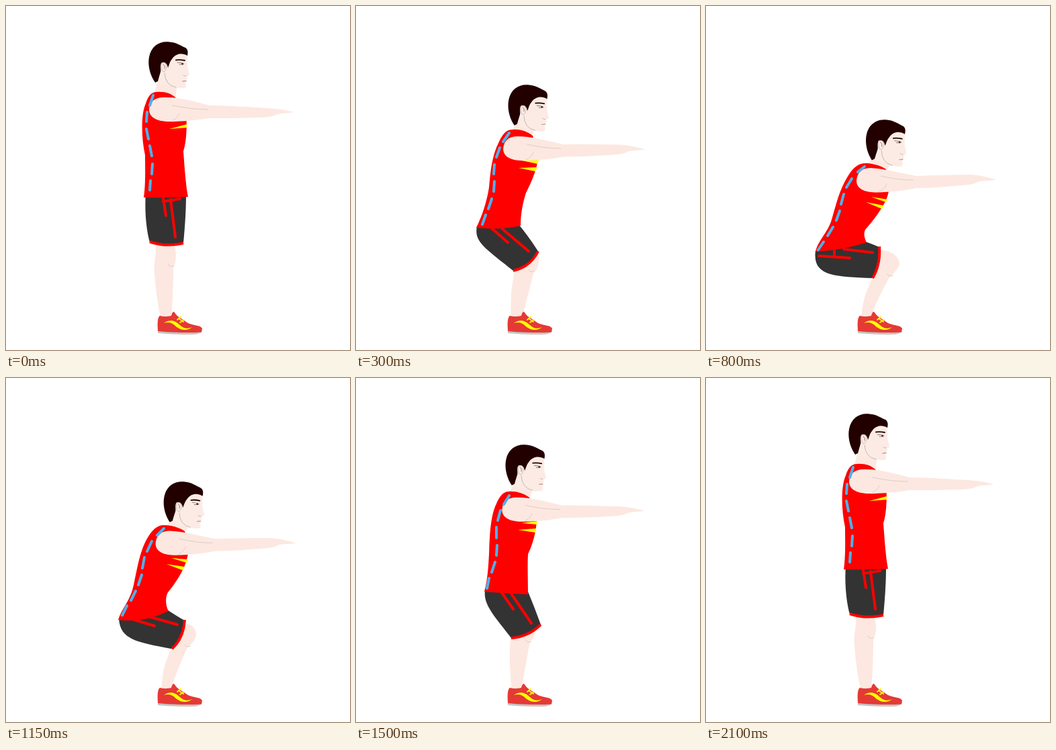
Write an HTML page that moves like this. It is 512 px wide and 512 px high and loops after 2150 ms.

```html
<!DOCTYPE html>
<html lang="en">
<head>
<meta charset="utf-8">
<title>Squat</title>
<style>
  html, body { margin: 0; width: 100%; height: 100%; overflow: hidden; background: #fff; }
  svg { display: block; width: 100%; height: 100%; }
  .red { fill: #f00; }
  .skin { fill: #fce8e0; }
  .dark { fill: #333; }
  .hair { fill: #200; }
  .yellow { fill: #ff0; }
  .line { fill: none; stroke-linecap: round; stroke-linejoin: round; }
  .trim { stroke: #f00; stroke-width: 4; }
  .spine { stroke: #4db1ea; stroke-width: 4; }
  .crease { stroke: #d3c5bf; stroke-width: .8; }
</style>
</head>
<body>
<svg viewBox="0 0 512 512">
  <path id="leg" class="skin"/>
  <path id="knee" class="line crease"/>
  <path id="shorts" class="dark"/>
  <path id="stripes" class="line trim"/>
  <path id="cuff" class="line trim" style="stroke-linecap:butt"/>
  <path id="neck" class="skin"/>
  <path id="torso" class="red"/>
  <path id="wedges" class="yellow"/>
  <path id="arm" class="skin"/>
  <path id="folds" class="line crease"/>
  <path id="spine" class="line spine"/>
  <g id="head">
    <path fill="#fcebe4" d="M229 99L232 84L248 70L269 70C271 82 269 89 271 94L273 101Q273 104 269 105L270 108L268 110L269 112L267 114Q269 118 267 122C257 123 250 122 243 118L228 116Z"/>
    <path class="hair" d="M222 114C213 101 211 86 213 76C216 60 228 52 243 53.5C253 54 260 59 267 62Q272 65 270 74C262 69 252 71 247 79C243 84 243 88 241 92C240 85 235 82 231 85C229 90 231 95 230 98L226 112Z"/>
    <path fill="#fcebe4" stroke="#b9a8a3" stroke-width=".7" d="M231 86Q237 82 239 89Q239 96 235 98Q231 97 231 86Z"/>
    <path class="line" stroke="#776460" stroke-width=".8" d="M234 87Q237 88 236 93"/>
    <path class="line" stroke="#b5aaa7" stroke-width=".8" d="M236 100Q237 118 253 121M264 103Q266 105 268 104"/>
    <path class="line" stroke="#200" stroke-width="1.8" d="M253 80.5Q259 79.500 266 81"/>
    <path class="line" stroke="#8b7c78" stroke-width="1" d="M255 84Q260 84 265 86M258 87L264 87"/>
    <circle cx="262.500" cy="86" r="1.300" fill="#322"/>
    <path class="line" stroke="#c99b96" stroke-width="1.400" d="M263 112L268 111.500"/>
  </g>
  <g id="shoe">
    <path fill="#c4c4c4" d="M226 481Q255 485 292 483Q290 489 276 489Q245 489 226 487Z"/>
    <path fill="#e53935" d="M226 484C225 470 226 463 229 461C236 463 242 462 246 461C247 457 248 455 250 455C252 457 253 460 256 462L271 472C280 476 290 475 292 480L291 485.500Q258 487 226 484Z"/>
    <path class="yellow" d="M235 472C245 465 253 469 259 475C264 480 270 481 277 478C270 484 260 483 253 477C247 471 242 470 235 472Z"/>
    <path class="line" stroke="#ff0" stroke-width="1.700" d="M255 467L260 462.500M259 471L265 467M257 465L264 470"/>
  </g>
</svg>
<script>
// Head drop, in px, at each time
const timeline = [
  [0, 0], [300, 64], [550, 116], [800, 116], [900, 115], [1000, 111.5], [1050, 109],
  [1100, 105.5], [1150, 101], [1300, 77], [1500, 46], [1700, 16], [1800, 1], [1850, 0], [2150, 0]
];
const loop = 2150, step = 50, lowest = 116;

// Outlines at each of these drops
const drops = [0, 16, 46, 64, 101, lowest];
const shapes = {
  torso: [
    "M205,285 C208,265 207,240 207,222 C201,195 201,160 208,145 C211,135 216,128 224,128 C236,127 246,130 253,137 L268,160 C270,180 268,205 264,216 C266,245 268,270 271,284 Q238,286 205,285Z",
    "M200,294 C203,275 205,255 204,236 C200,210 199,178 207,160 C210,150 216,142 224,142 C236,141 246,144 254,151 L267,176 C270,195 266,218 261,231 C262,255 264,275 266,295 Q233,296 200,294Z",
    "M191,318 C196,300 197,280 198,262 C199,235 200,205 209,187 C213,177 219,169 227,169 C239,168 250,172 258,178 L269,203 C270,222 264,246 256,262 C255,282 256,302 256,322 Q224,321 191,318Z",
    "M179,330 C188,312 195,290 198,270 C200,245 203,222 212,204 C217,192 224,183 233,184 C245,183 255,187 263,193 L271,225 C270,242 262,260 253,278 C248,294 245,310 245,327 Q215,334 179,330Z",
    "M167,360 C172,343 186,330 190,308 C195,285 199,258 210,239 C217,227 224,219 235,219 C247,219 258,223 266,228 L271,258 C271,275 257,300 241,319 C237,326 237,338 242,347 Q205,365 167,360Z",
    "M163,366 C167,348 181,338 187,318 C194,294 199,272 212,252 C219,241 226,234 238,234 C249,234 260,238 268,243 L272,274 C271,290 255,312 237,333 C234,339 236,346 239,352 Q205,363 163,366Z"
  ],
  shorts: [
    "M208,280 C206,305 209,335 214,352 Q238,359 264,353 Q268,310 268,282Z",
    "M204,290 C204,318 210,343 217,366 Q242,373 267,362 Q266,320 264,292Z",
    "M192,316 C189,338 207,355 231,387 Q257,385 275,367 Q266,342 256,318Z",
    "M180,328 C175,352 195,362 234,394 Q260,388 271,365 Q257,343 242,325Z",
    "M168,358 C170,390 195,393 246,403 Q265,388 266,361 Q252,353 240,345Z",
    "M163,364 C158,402 190,403 248,405 Q260,385 258,359 Q247,354 238,351Z"
  ],
  cuff: [
    "M214,351 Q238,359 264,353",
    "M217,366 Q242,373 267,362",
    "M231,387 Q257,385 275,367",
    "M234,394 Q260,388 271,365",
    "M247,403 Q264,388 266,360",
    "M248,405 Q260,385 258,358"
  ],
  stripes: [
    "M234,286 L238,312 M245,288 L252,344 M234,291 L259,287",
    "M229,297 L237,327 M239,297 L254,356 M231,303 L256,297",
    "M216,318 L234,344 M231,321 L261,365 M218,316 L245,316",
    "M201,330 L226,352 M218,332 L257,365 M205,326 L232,324",
    "M178,356 L221,369 M212,355 L255,367 M190,355 L200,353",
    "M168,372 L214,375 M205,362 L248,367 M191,364 L191,372"
  ],
  leg: [
    "M222,350 C226,370 219,375 221,400 Q224,435 230,464 L246,464 Q249,425 249,390 Q253,382 253,370 Q252,362 251,350Z",
    "M226,365 C223,375 222,392 225,412 Q227,440 233,464 L246,464 Q249,425 250,390 Q255,382 256,372 Q256,368 256,362Z",
    "M230,380 C230,395 228,410 229,425 Q230,445 231,464 L246,464 Q252,430 259,392 Q264,389 266,382 Q267,378 267,372Z",
    "M236,385 C236,400 231,420 231,430 Q230,445 231,464 L247,464 Q255,435 264,398 Q271,391 272,382 Q273,374 271,366Z",
    "M247,398 C243,410 236,425 234,438 Q232,450 231,464 L246,464 Q250,445 270,401 Q284,390 283,380 Q281,366 264,365Z",
    "M249,400 C245,412 238,425 235,438 Q232,450 231,464 L246,464 Q250,445 273,404 Q288,390 288,383 Q285,365 258,363Z"
  ],
  wedges: [
    "M243,183 L269,176 L269,181Z M245,173 L269,162 L269,167Z",
    "M241,198 L268,192 L268,197Z M245,187 L268,181 L268,186Z",
    "M241,226 L268,224 L267,230Z M246,216 L270,213 L269,218Z",
    "M242,241 L270,240 L267,246Z M247,230 L272,229 L270,235Z",
    "M239,277 L266,281 L263,286Z M246,268 L271,270 L269,275Z",
    "M238,292 L265,297 L262,302Z M246,284 L270,288 L268,292Z"
  ],
  spine: [
    "M219,133 L214,148 M210,158 L209,172 M209,183 L212,198 M214,208 L217,223 M218,235 L217,250 M215,260 L214,274",
    "M221,149 L215,161 M211,172 L209,187 M209,198 L211,213 M214,223 L215,239 M214,250 L212,265 M209,275 L208,290",
    "M228,175 L220,188 M215,197 L211,212 M209,222 L209,238 M210,249 L209,264 M207,274 L202,289 M198,298 L195,313",
    "M228,189 L219,202 M214,211 L209,225 M206,236 L205,250 M206,261 L205,276 M202,287 L197,302 M193,311 L188,325",
    "M235,224 L225,234 M217,243 L210,258 M206,267 L203,283 M202,293 L197,308 M193,317 L186,331 M180,339 L173,353",
    "M236,239 L226,247 M217,257 L209,270 M205,280 L201,295 M199,305 L194,319 M189,329 L181,342 M175,351 L167,363"
  ]
};

// Parts that move evenly between standing and squatting
const simple = {
  arm: [
    "M213,154 C214,142 222,136 234,136 C256,135 280,142 303,148 C335,148 365,151 391,152 C405,153 418,155 428,158 C420,160 412,159 404,161 C396,165 388,166 375,166 C350,167 325,167 301,167 C285,170 262,172 243,172 C225,172 213,166 213,154Z",
    "M224,260 C225,247 233,241 245,241 C266,242 290,249 313,253 C340,252 368,251 396,251 C410,252 422,256 432,258.5 C422,261 412,259 405,262 C398,266 388,266 380,267 C356,269 335,271 313,271 C297,275 272,277 252,277.5 C234,277 224,271 224,260Z"
  ],
  folds: [
    "M248,148 Q275,154 300,154 M258,160 Q255,167 247,171",
    "M260,253 Q285,259 308,259 M269,265 Q266,272 258,276"
  ],
  neck: ["M226,108 L221,130 L252,137 L255,118Z", "M252,222 L238,238 L268,245 L276,234Z"],
  knee: ["M241,384 Q243,389 249,387", "M270,399 Q272,404 278,401"]
};

const el = id => document.getElementById(id);
const lerp = (a, b, k) => a + (b - a) * k;

// Blend two paths that share the same commands
function mix(a, b, k) {
  const num = /[\d.]+/g, to = b.match(num);
  let i = 0;
  return a.replace(num, n => lerp(+n, +to[i++], k).toFixed(2));
}

function dropAt(t) {
  const i = timeline.findIndex(p => p[0] > t);
  const [t0, a] = timeline[i - 1], [t1, b] = timeline[i];
  return lerp(a, b, (t - t0) / (t1 - t0));
}

function draw(t) {
  const drop = dropAt(t), k = drop / lowest;
  let i = 0;
  while (i < drops.length - 2 && drop > drops[i + 1]) i++;
  const part = (drop - drops[i]) / (drops[i + 1] - drops[i]);
  for (const id in shapes) el(id).setAttribute("d", mix(shapes[id][i], shapes[id][i + 1], part));
  for (const id in simple) el(id).setAttribute("d", mix(...simple[id], k));
  el("head").setAttribute("transform", `translate(${26.5 * k} ${drop}) rotate(${1.6 * k} 240 55)`);
}

const start = performance.now();
function tick() {
  const t = (performance.now() - start) % loop;
  draw(Math.floor(t / step) * step);
  requestAnimationFrame(tick);
}
tick();
</script>
</body>
</html>
```
